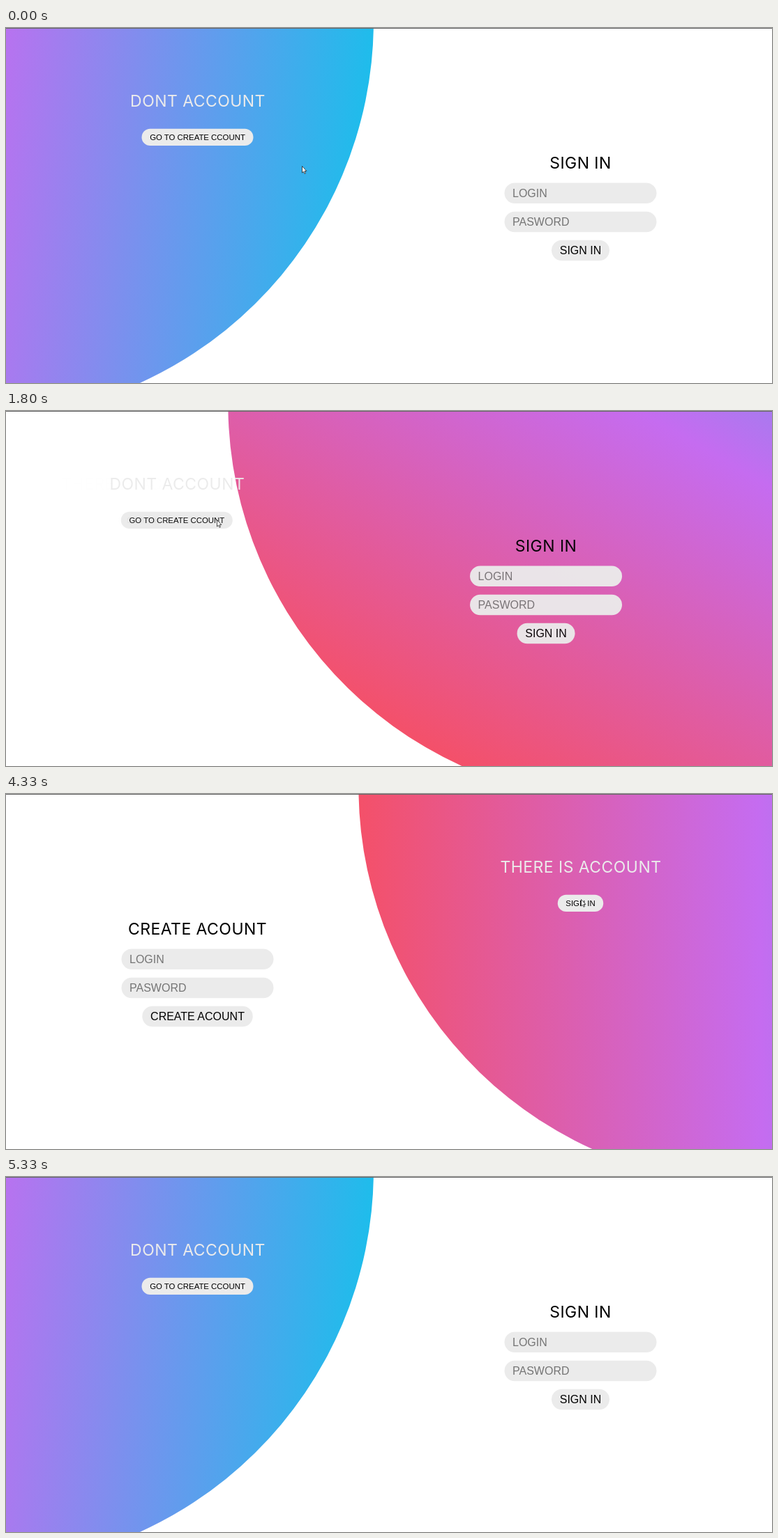
Write an HTML page that moves like this. It is 1098 px wide and 510 px high and loops after 5940 ms.

```html
<!DOCTYPE html>
<html lang="en">
<head>
<meta charset="utf-8">
<title>Sign in / create account</title>
<style>
  html, body { margin: 0; width: 100%; height: 100%; overflow: hidden; background: #fff; }
  svg { display: block; width: 1098px; height: 510px; }
  text { font-family: "Liberation Sans", Arial, sans-serif; text-anchor: middle; }
  .title { font: 400 23px Inter, sans-serif; letter-spacing: .45px; }
  .info .title { fill: #ebebeb; }
  .big { font-size: 16px; }
  .small { font-size: 11.4px; }
  .hint { font-size: 16px; fill: #757575; text-anchor: start; }
  .pill { fill: #ebebeb; }
</style>
</head>
<body>
<svg viewBox="0 0 1098 510">
  <defs>
    <linearGradient id="paint" gradientUnits="userSpaceOnUse" x1="-598" y1="0" x2="598" y2="0">
      <stop offset="0" stop-color="#f64f63"/>
      <stop offset=".5" stop-color="#c56cf0"/>
      <stop offset="1" stop-color="#17c0eb"/>
    </linearGradient>
  </defs>
  <circle id="disc" r="572" fill="url(#paint)"/>
  <g id="panels"></g>
  <rect width="1098" height="1" fill="#666"/>
  <path id="cursor" d="M.5 .5V10L2.6 8.1L4 11.3L5.5 10.6L4.1 7.5H6.9Z" fill="#fff" stroke="#222" stroke-width=".8"/>
</svg>
<script>
const LOOP = 5940, STEP = 1000 / 15;
const LEFT = 274.5, RIGHT = 823.5;
const FORWARD = { at: 1308, span: 954 }, BACK = { at: 4300, span: 1000 };
const SLIDE_DELAY = 461, SLIDE = 500;
const $ = id => document.getElementById(id);

const pill = (cx, y, w, h) =>
  `<rect class="pill" x="${cx - w / 2}" y="${y}" width="${w}" height="${h}" rx="${h / 2}"/>`;
const label = (kind, x, y, text) => `<text class="${kind}" x="${x}" y="${y}">${text}</text>`;
const field = (cx, y, text) => pill(cx, y, 218, 29.5) + label("hint", cx - 97.5, y + 20.5, text);

const info = (cx, title, action, w) => `<g class="info">${label("title", cx + .5, 113, title)}
  ${pill(cx, 144.7, w, 24.4)}${label("small", cx, 160.7, action)}</g>`;
const form = (cx, title, action, w) => `<g>${label("title", cx, 202.3, title)}
  ${field(cx, 222.5, "LOGIN")}${field(cx, 263.7, "PASWORD")}
  ${pill(cx, 304.8, w, 29.5)}${label("big", cx, 325.2, action)}</g>`;

$("panels").innerHTML =
  info(LEFT, "DONT ACCOUNT", "GO TO CREATE CCOUNT", 160) +
  form(RIGHT, "SIGN IN", "SIGN IN", 83) +
  info(RIGHT, "THERE IS ACCOUNT", "SIGN IN", 65.5) +
  form(LEFT, "CREATE ACOUNT", "CREATE ACOUNT", 158.5);
const panels = [...$("panels").children];

// The CSS "ease" curve: find the parameter for x by bisection, return y.
function ease(x) {
  if (x <= 0) return 0;
  if (x >= 1) return 1;
  let lo = 0, hi = 1, u;
  for (let i = 0; i < 24; i++) {
    u = (lo + hi) / 2;
    if (.75 * u - .75 * u * u + u ** 3 < x) lo = u; else hi = u;
  }
  return .3 * u * (1 - u) ** 2 + 3 * u * u * (1 - u) + u ** 3;
}

// Both go from 0 (signing in) to 1 (creating an account) and back.
const turn = t =>
  ease((t - FORWARD.at) / FORWARD.span) - ease((t - BACK.at) / BACK.span);
const swapped = t =>
  ease((t - FORWARD.at - SLIDE_DELAY) / SLIDE) - ease((t - BACK.at - SLIDE_DELAY) / SLIDE);

// time, x, y of the pointer
const path = [
  [0, 424, 198], [405, 424, 198], [867, 302, 156], [2467, 302, 156], [2533, 520, 154],
  [2600, 889, 192], [2867, 889, 192], [3467, 824, 151], [4333, 824, 151],
  [4667, 58, 473], [4800, -20, 525], [LOOP, -20, 525]
];

function pointer(t) {
  const i = path.findIndex(k => k[0] > t);
  const [t0, x0, y0] = path[i - 1], [t1, x1, y1] = path[i];
  const u = (t - t0) / (t1 - t0), s = u * u * (3 - 2 * u);
  return [x0 + (x1 - x0) * s, y0 + (y1 - y0) * s];
}

function draw(now) {
  const t = Math.floor((now % LOOP + 5) / STEP) * STEP;

  const spin = turn(t);
  $("disc").setAttribute("transform",
    `translate(${-45 + 1144 * spin} -10.6) rotate(${6 + 360 * spin})`);

  const swap = swapped(t);
  panels.forEach((panel, i) => {
    const gone = i < 2 ? swap : 1 - swap;
    const reach = i % 2 ? 1098 : 659;
    panel.setAttribute("transform", `translate(${-reach * gone} 0)`);
    panel.setAttribute("opacity", 1 - gone);
  });

  $("cursor").setAttribute("transform", `translate(${pointer(t)})`);
  requestAnimationFrame(tick);
}

const start = performance.now();
const tick = () => draw(performance.now() - start);
tick();
</script>
</body>
</html>
```
